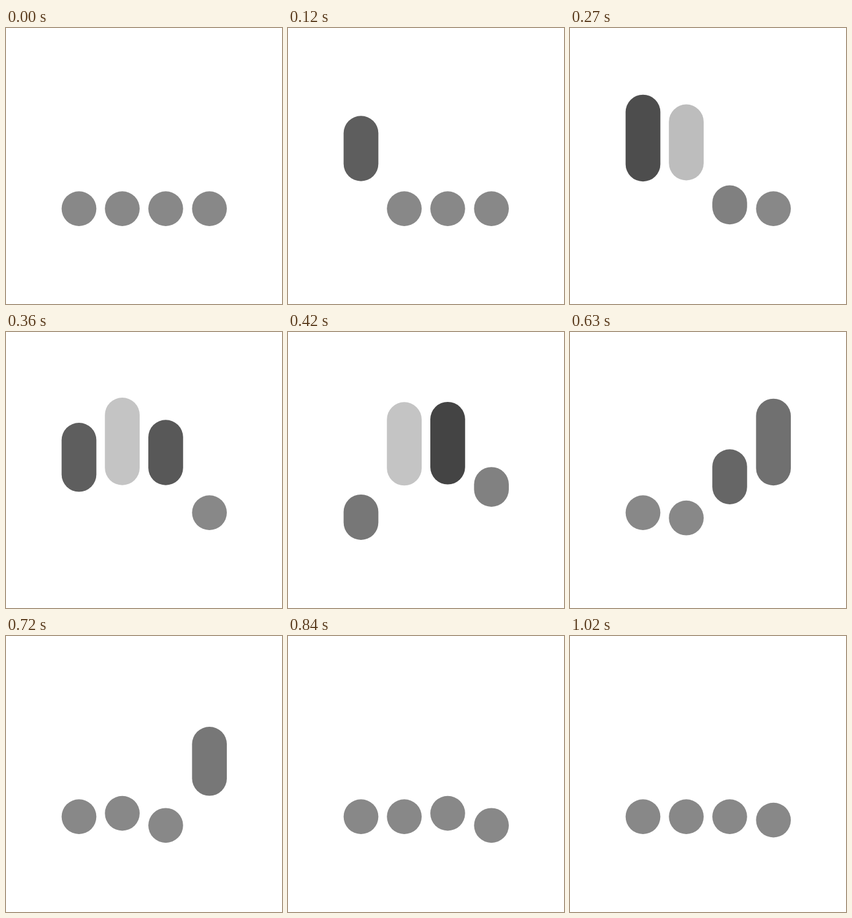
Recreate the animation shown at these times as an HTML page. Size 450 by 450 pixels, loop 1.05 s.

```html
<!DOCTYPE html>
<html lang="en">
<head>
<meta charset="utf-8">
<title>Bouncing dots</title>
<style>
  html, body { margin: 0; width: 100%; height: 100%; overflow: hidden; background: #fff; }
  svg { display: block; width: 100%; height: 100%; }
  line { stroke-width: 56.7; stroke-linecap: round; }
</style>
</head>
<body>
<svg viewBox="0 0 450 450"></svg>
<script>
const LOOP = 1050, STEP = 30, STAGGER = 120;
const REST_Y = 294.6, REST_GREY = 136;

// x position and the grey reached in the air
const bars = [[119, 77], [189.6, 196], [260.4, 68], [331.7, 112]];

// Keys: time, height above rest, and the ease that leads there
const key = (time, height, x1 = 0.5, x2 = 0.5) => ({ time, height, x1, x2 });
const bounce = [key(445, -16), key(600, 5.5), key(660, -5.5), key(720, 0)];
const head = [key(0, 0), key(240, 159.2, 0.333, 0.235), key(445, -16, 0.923, 0.716), ...bounce.slice(1)];
const tail = [key(0, 0), key(150, 74.5, 0.73, 0), key(300, 72.6), key(420, -16, 1, 0.9), ...bounce];

// Cubic Bezier ease through (x1, 0) and (x2, 1)
function ease(p, x1, x2) {
  let low = 0, high = 1, s;
  for (let i = 0; i < 24; i++) {
    s = (low + high) / 2;
    const x = 3 * s * (1 - s) * ((1 - s) * x1 + s * x2) + s ** 3;
    if (x < p) low = s; else high = s;
  }
  return s * s * (3 - 2 * s);
}

function heightAt(track, ms) {
  const next = track.findIndex(k => k.time > ms);
  if (next < 1) return 0;
  const a = track[next - 1], b = track[next];
  const p = (ms - a.time) / (b.time - a.time);
  return a.height + (b.height - a.height) * ease(p, b.x1, b.x2);
}

// Fade in over 180 ms, hold, fade out by 480 ms
function tint(ms) {
  const p = Math.max(0, Math.min(1, Math.min(ms, 480 - ms) / 180));
  const smooth = (1 - Math.cos(Math.PI * p)) / 2;
  return (p + smooth) / 2;
}

const svg = document.querySelector('svg');
const lines = bars.map(([x]) => {
  const line = document.createElementNS(svg.namespaceURI, 'line');
  line.setAttribute('x1', x);
  line.setAttribute('x2', x);
  return svg.appendChild(line);
});

function draw(now) {
  const time = Math.floor(now % LOOP / STEP) * STEP;
  bars.forEach(([, grey], i) => {
    const ms = time - i * STAGGER, line = lines[i];
    const shade = Math.round(REST_GREY + (grey - REST_GREY) * tint(ms));
    line.setAttribute('y1', REST_Y - heightAt(head, ms));
    // A tiny length keeps the round caps painted at rest
    line.setAttribute('y2', REST_Y - heightAt(tail, ms) + 0.01);
    line.setAttribute('stroke', `rgb(${shade},${shade},${shade})`);
  });
}

const start = performance.now();
function tick() {
  draw(performance.now() - start);
  requestAnimationFrame(tick);
}
tick();
</script>
</body>
</html>
```
